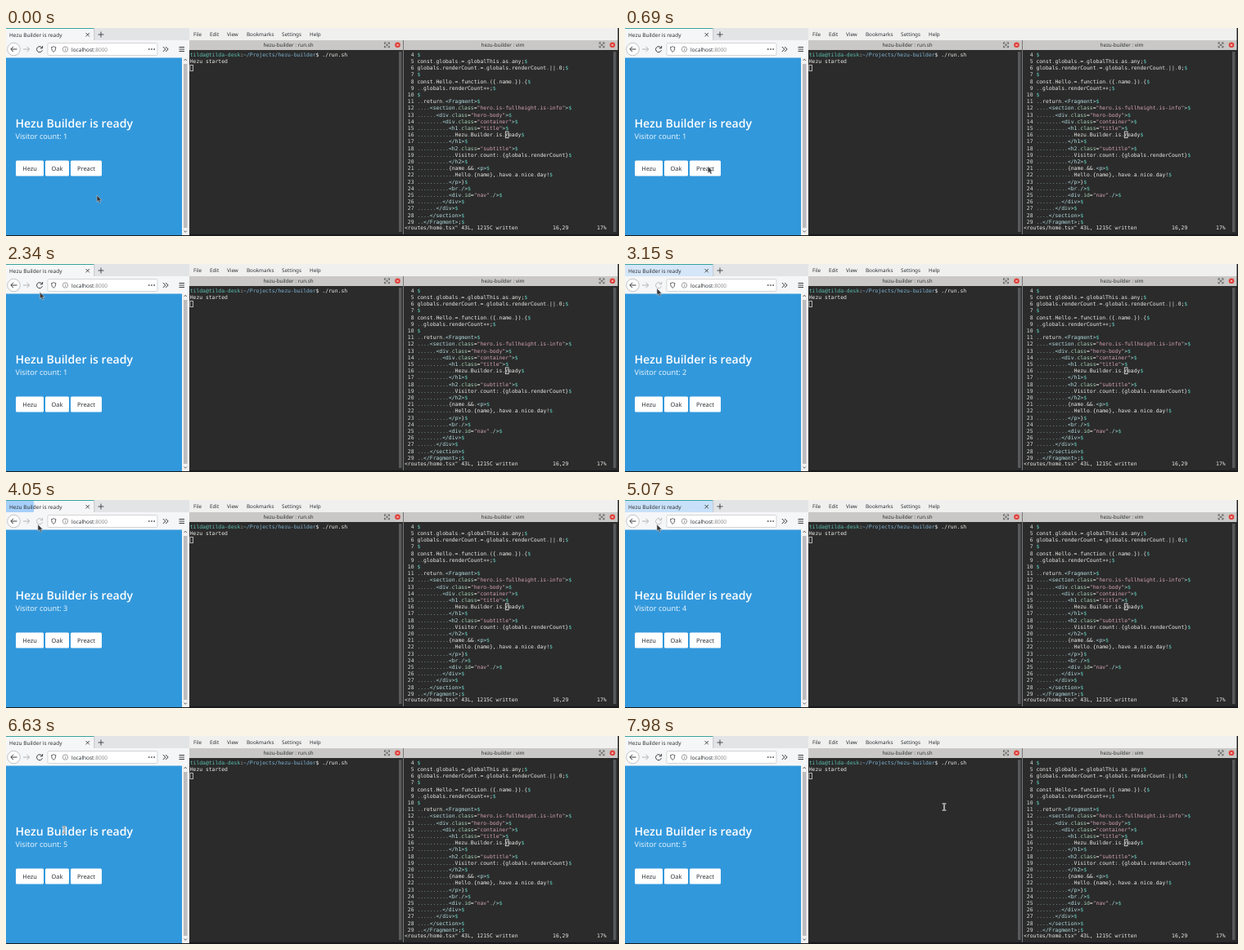
Recreate the animation shown at these times as an HTML page. Size 749 px wide and 255 px high, loop 8000 ms.

```html
<!DOCTYPE html>
<html lang="en">
<head>
<meta charset="utf-8">
<style>
  html, body { margin: 0; width: 100%; height: 100%; overflow: hidden; background: #2b2b2b; }
  svg { display: block; width: 749px; height: 255px; }
  text { font-family: "Noto Sans", "Open Sans", sans-serif; font-size: 6.3px; fill: #2e3236; white-space: pre; text-rendering: geometricPrecision; }
  .mono text { font-family: "DejaVu Sans Mono", "Noto Sans Mono", monospace; font-size: 6.4px; fill: #ececea; }
  .mid { text-anchor: middle; }
  .icon { fill: none; stroke: #3c3c40; }
</style>
</head>
<body>
<svg viewBox="0 0 749 255">
  <defs>
    <clipPath id="tab"><rect width="107.5" height="15"/></clipPath>
    <g id="controls">
      <path class="icon" stroke-width=".7" d="M-16 -1v-2h2M-12 -3h2v2M-10 1v2h-2M-14 3h-2v-2M-15 -2l4 4M-11 -2l-4 4"/>
      <circle r="3.3" fill="#df3b35"/>
      <path d="M-1.2 -1.2l2.4 2.4M1.2 -1.2l-2.4 2.4" stroke="#fff" stroke-width=".7"/>
    </g>
  </defs>

  <!-- browser -->
  <rect width="224" height="15" fill="#e3e4e6"/>
  <rect y="15" width="224" height="22" fill="#f5f6f7"/>
  <rect width="107.5" height="15" fill="#f5f6f7"/>
  <circle id="burst" cx="4" cy="8" fill="#0a84ff" clip-path="url(#tab)"/>
  <rect width="107.5" height="1" fill="#35a5a0"/>
  <rect x="107.5" width=".7" height="15" fill="#b9babd"/>
  <text x="4" y="10.7" style="font-size:6.5px">Hezu Builder is ready</text>
  <path class="icon" stroke-width=".9" d="M97.5 6l4.4 4.4M101.9 6l-4.4 4.4M112.5 8h7M116 4.5v7"/>
  <circle cx="9.5" cy="26" r="7.8" fill="#fff" stroke="#aaa" stroke-width=".7"/>
  <path class="icon" d="M13.5 26h-7.5M9 22.8l-3.2 3.2l3.2 3.2"/>
  <path class="icon" style="stroke:#b2b2b5" d="M21 26h7.5M25.5 22.8l3.2 3.2l-3.2 3.2"/>
  <path id="reload" class="icon" d="M43.8 24a3.5 3.5 0 1 0 .6 3.2M44.6 22v2.8h-2.8"/>
  <rect x="51" y="18.5" width="134" height="15" rx="1.5" fill="#fff" stroke="#c4c4c6" stroke-width=".7"/>
  <path class="icon" stroke-width=".8" d="M55.5 23.5q2 0 2.7-1q.7 1 2.7 1q0 4.5-2.7 6q-2.7-1.500-2.7-6z"/>
  <g class="icon" style="stroke:#77777a" stroke-width=".7"><circle cx="72.5" cy="26" r="3.2"/><path d="M72.5 25.5v2.3M72.5 23.7v.8"/></g>
  <text x="80" y="28.500" style="font-size:6.5px">localhost<tspan fill="#8a8a8e">:8000</tspan></text>
  <path d="M174 26h1.5M177.2 26h1.5M180.4 26h1.5" stroke="#3c3c40" stroke-width="1.5"/>
  <path class="icon" d="M191.8 23l3 3l-3 3M195.2 23l3 3l-3 3M211.5 23.5h6.5M211.5 26h6.5M211.5 28.5h6.5"/>

  <rect y="252.7" width="749" height="2.3" fill="#17191b"/>
  <rect y="36.5" width="215" height="217.5" fill="#3298dc"/>
  <rect x="215" y="36.5" width="9" height="217.5" fill="#f1f1f1"/>
  <rect x="217" y="44" width="4.5" height="201" fill="#bcbcbe"/>
  <path class="icon" stroke-width=".8" d="M217.5 40l1.7-1.8l1.7 1.8M217.5 248.5l1.7 1.8l1.7-1.8"/>
  <text x="11.5" y="122.3" style="font-family:'Open Sans','Noto Sans',sans-serif;font-size:14.1px;font-weight:600;fill:#fff">Hezu Builder is ready</text>
  <text id="count" x="11.5" y="136.3" style="font-size:9.1px;fill:#e6f3fb"></text>
  <g id="buttons"></g>

  <!-- terminals -->
  <rect x="224" width="525" height="15" fill="#f0f0ef"/>
  <g id="menu"></g>
  <rect x="224" y="15" width="525" height="12" fill="#c9c8c6"/>
  <text class="mid" x="345" y="23">nexo</text>
  <text class="mid" x="607" y="23">hezu-builder : vim</text>
  <use href="#controls" x="478.5" y="20.8"/>
  <use href="#controls" x="741" y="20.8"/>
  <rect x="224" y="27" width="525" height="225.7" fill="#2b2b2b"/>
  <rect x="480" y="29" width="3.5" height="221" fill="#58595b"/>
  <rect x="742" y="29" width="3.5" height="221" fill="#58595b"/>
  <rect x="485" y="15" width="1" height="238" fill="#77787a"/>
  <rect x="747.5" width="1.5" height="255" fill="#202122"/>
  <g class="mono" id="terminal"></g>
  <rect x="225" y="45.3" width="3.4" height="7.4" fill="none" stroke="#eee" stroke-width=".7"/>
  <rect x="610.3" y="127" width="3.7" height="7.7" fill="none" stroke="#eee" stroke-width=".8"/>

  <path id="arrow" d="M0 0v8.2l1.9-1.7l1.4 2.9l1.5-.7l-1.4-2.8h2.5z" fill="#38383a" stroke="#c4ccd2" stroke-width=".6"/>
  <g id="beam" fill="none">
    <path d="M-2.3 -4h4.6M0 -4v8M-2.3 4h4.6" stroke="#dcdcdc" stroke-width="1.7"/>
    <path d="M-2 -4h4M0 -4v8M-2 4h4" stroke="#505050" stroke-width=".5"/>
  </g>
</svg>
<script>
const $ = id => document.getElementById(id);
const NS = 'http://www.w3.org/2000/svg';

function add(parent, tag, attrs, content = '') {
  const el = document.createElementNS(NS, tag);
  for (const key in attrs) el.setAttribute(key, attrs[key]);
  el.textContent = content;
  parent.appendChild(el);
  return el;
}

document.querySelector('text.mid').textContent = 'hezu-builder : run.sh';

[['File', 229], ['Edit', 249], ['View', 270], ['Bookmarks', 294], ['Settings', 337], ['Help', 371]]
  .forEach(([label, x]) => add($('menu'), 'text', { x, y: 9.8 }, label));

[['Hezu', 12, 34], ['Oak', 48, 29], ['Preact', 79, 38]].forEach(([label, x, width]) => {
  add($('buttons'), 'rect', { x, y: 162.5, width, height: 19, rx: 1.5, fill: '#fff' });
  add($('buttons'), 'text', { x: x + width / 2, y: 174.5, class: 'mid', style: 'font-size:7.4px' }, label);
});

const CELL = 3.853, LINE = 8.2;
function print(x, row, spans) {
  const line = add($('terminal'), 'text', { x, y: 34.7 + row * LINE });
  spans.forEach(([content, fill]) => add(line, 'tspan', fill ? { fill } : {}, content));
}

print(224.7, 0, [['tilda@tilda-desk', '#5cc0b0'], [':'], ['~/Projects/hezu-builder', '#7fb6d4'], ['$ ./run.sh']]);
print(224.7, 1, [['Hezu started']]);

const code = `
const globals = globalThis as any;
globals.renderCount = globals.renderCount || 0;

const Hello = function ({ name }) {
  globals.renderCount++;

  return <Fragment>
    <section class="hero is-fullheight is-info">
      <div class="hero-body">
        <div class="container">
          <h1 class="title">
            Hezu Builder is ready
          </h1>
          <h2 class="subtitle">
            Visitor count: {globals.renderCount}
          </h2>
          {name && <p>
            Hello {name}, have a nice day!
          </p>}
          <br />
          <div id="nav" />
        </div>
      </div>
    </section>
  </Fragment>;`;

const colors = { string: '#d6a3b6', space: '#84a09c', end: '#5fc9b8', attribute: '#a9d6b8', tag: '#b4dde0' };
const tokens = /(?<string>"[^"]*")|(?<space>·+)|(?<end>\$$)|(?<attribute>\w+(?==))|(?<tag><\/?\w+|\/?>)|[^"·$<>\/\w]+|\w+|./g;
code.split('\n').forEach((source, row) => {
  const spans = [[String(row + 4).padStart(3) + ' ', '#d8dedc']];
  for (const match of (source.replace(/ /g, '·') + '$').matchAll(tokens)) {
    const kind = Object.keys(colors).find(name => match.groups[name]);
    spans.push([match[0].replace(/·/g, '.'), colors[kind]]);
  }
  print(487, row, spans);
});
[['<routes/home.tsx" 43L, 1215C written', 0], ['16,29', 47], ['17%', 61]]
  .forEach(([label, column]) => print(487 + column * CELL, 25.95, [[label]]));

const LOOP = 8000, BURST = 400, RELOAD_LOCK = 650;
const loads = [2890, 3990, 4860, 5850];

// time, x, y of the mouse
const path = [
  [0, 111, 205], [60, 111, 205], [1350, 91, 132], [1600, 91, 132], [2450, 39, 30],
  [6230, 39, 30], [6630, 71, 115], [6780, 71, 115], [7560, 303, 99.5], [7620, 330, 99.5],
  [7920, 330, 99.5], [7980, 390, 87], [8000, 390, 87]
];

function mouseAt(t) {
  const i = path.findIndex(key => key[0] > t);
  const [t0, x0, y0] = path[i - 1], [t1, x1, y1] = path[i];
  const u = (t - t0) / (t1 - t0);
  const eased = t < 6780 ? u * u * (3 - 2 * u) : u;
  return [x0 + (x1 - x0) * eased, y0 + (y1 - y0) * eased];
}

function draw(t) {
  const done = loads.filter(time => time <= t);
  const age = done.length ? t - done[done.length - 1] : Infinity;
  const p = Math.min(age / BURST, 1);
  $('count').textContent = 'Visitor count: ' + (1 + done.length);
  $('burst').setAttribute('r', 200 * p);
  $('burst').setAttribute('opacity', 0.4 * (1 - p));
  $('reload').style.stroke = age < RELOAD_LOCK ? '#bcbcbf' : '#3c3c40';

  const [x, y] = mouseAt(t);
  const overText = x > 224 || (x > 11 && x < 157 && y > 106 && y < 128);
  for (const id of ['arrow', 'beam']) {
    $(id).setAttribute('transform', `translate(${x} ${y})`);
    $(id).style.display = (id === 'beam') === overText ? '' : 'none';
  }
}

const start = performance.now();
function tick() {
  draw((performance.now() - start) % LOOP);
  requestAnimationFrame(tick);
}
tick();
</script>
</body>
</html>
```
